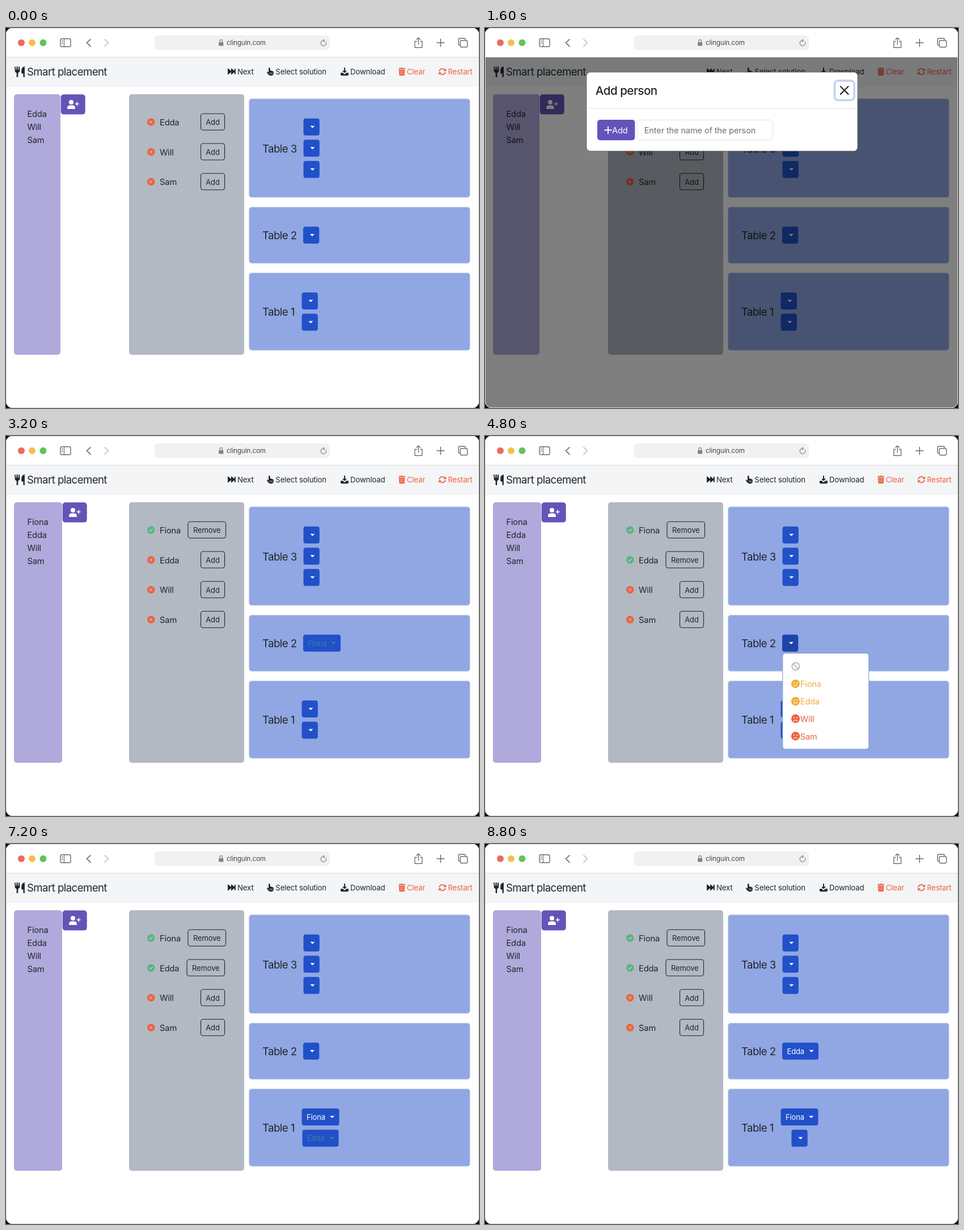
An HTML page for the animation above (9.6 s loop, 834 by 671 pixels).

```html
<!DOCTYPE html>
<html lang="en">
<head>
<meta charset="utf-8">
<title>Smart placement</title>
<style>
  html, body { margin: 0; width: 100%; height: 100%; overflow: hidden; background: #000; }
  svg { display: block; width: 834px; height: 671px; border-radius: 11px; background: #fff; }
  text { font-family: Inter, "Liberation Sans", sans-serif; white-space: pre; }
</style>
</head>
<body>
<svg id="stage" viewBox="0 0 834 671">
  <g id="page"></g>
  <g id="chrome"></g>
  <rect x=".5" y=".5" width="833" height="670" rx="10.5" fill="none" stroke="#d6d6d6"/>
</svg>
<script>
const INK = '#212529', PURPLE = '#6354b8', PURPLE_DARK = '#54479c';
const BLUE = '#2150c9', BLUE_DARK = '#1c44ab', DIM = '#3d80a8';
const RED = '#ee6140', ORANGE = '#f1ae3f', GREEN = '#5bb381', GREY = '#b2b9c3';
const STEP = 800;

// --- drawing helpers ---
const rect = (x, y, w, h, r, fill, extra = '') =>
  `<rect x="${x}" y="${y}" width="${w}" height="${h}" rx="${r}" fill="${fill}" ${extra}/>`;
const circle = (x, y, r, fill, extra = '') =>
  `<circle cx="${x}" cy="${y}" r="${r}" fill="${fill}" ${extra}/>`;
const fillPath = (d, fill) => `<path d="${d}" fill="${fill}"/>`;
const line = (d, color, w = 1.4, extra = 'stroke-linecap="round" stroke-linejoin="round"') =>
  `<path d="${d}" fill="none" stroke="${color}" stroke-width="${w}" ${extra}/>`;
const at = (x, y, body) => `<g transform="translate(${x} ${y})">${body}</g>`;

// y is the middle of the capitals
function text(s, x, y, size, color = INK, { spacing = -.01, anchor = 'start', weight = 400 } = {}) {
  return `<text x="${x}" y="${(y + size * .364).toFixed(2)}" font-size="${size}" fill="${color}" ` +
    `text-anchor="${anchor}" font-weight="${weight}" letter-spacing="${spacing}em">${s}</text>`;
}

// --- browser bar ---
function browserBar() {
  const g = '#6c6c6c';
  return rect(0, 0, 834, 51, 0, '#fff') + rect(0, 51, 834, 1, 0, '#d9dadb') +
    circle(27, 26, 6, '#ec6a5e') + circle(46, 26, 6, '#f4bf4f') + circle(65.5, 26, 6, '#61c554') +
    rect(96, 19, 18, 14, 2.5, 'none', `stroke="${g}" stroke-width="1.4"`) +
    line('M102.5 19V33M98.3 22.3h2M98.3 25h2M98.3 27.7h2', g, 1.1) +
    line('M149 20l-6.5 6 6.5 6.3', '#5f5f5f', 1.6) +
    line('M174 20l6.5 6-6.5 6.3', '#bcbcbc', 1.6) +
    rect(262, 13, 309, 26, 6, '#f1f1f1') +
    rect(375.2, 25, 8, 6.6, 1.2, '#838383') +
    line('M376.9 25v-2a2.3 2.4 0 0 1 4.6 0v2', '#838383', 1.2) +
    text('clinguin.com', 423.5, 26, 11.7, '#444', { anchor: 'middle' }) +
    line('M564.3 24.6a4.8 4.8 0 1 1-3-2.6M559.4 20.2l2.3 2-2.2 2.2', '#808080', 1.1) +
    line('M724 23.5h-3.2v11h12.8v-11h-3.2M727.2 29V17.4M724 20.3l3.2-3.2 3.2 3.2', g, 1.3) +
    line('M766.3 19.5v13.2M759.7 26.1h13.2', g, 1.5) +
    rect(801, 22, 12.6, 11.8, 2.6, '#fff', `stroke="${g}" stroke-width="1.4"`) +
    line('M800.5 30.5a2.6 2.6 0 0 1-2.6-2.6v-7a2.6 2.6 0 0 1 2.6-2.6h7a2.6 2.6 0 0 1 2.6 2.6', g);
}

// --- toolbar of the app ---
const icons = {
  utensils: fillPath('M0 0h1.6l.5 6h.9l.4-6h1.9l.4 6h.9l.5-6h1.6l.4 6.6q0 4-3.1 4.6v6.6q0 1.2-1.3 1.2t-1.3-1.2v-6.6' +
    'q-3.1-.6-3.1-4.6zM17.6 0v17.8q0 1.2-1.2 1.2t-1.2-1.2v-5.2h-2q-1.2 0-1.2-1.4v-5.2q.4-5 5.6-6z', INK),
  next: fillPath('M0 .7v9.6q0 1 .9.5l5-4.2v3.7q0 1 .9.5l5-4.2v3.6h2V.8h-2v3.6l-5-4.2q-.9-.5-.9.5v3.7l-5-4.2q-.9-.5-.9.5z', INK),
  hand: fillPath('M3 1.2a1.3 1.3 0 0 1 2.6 0v4q1.3-.6 2.2.5 1.2-.5 2 .6 2-.2 2 1.6v2.4q0 3.7-3.7 3.7h-2.4' +
    'q-1.6 0-2.7-1.4L.3 9.2q-.7-1.2.3-1.8 1-.4 1.7.5l.7.8z', INK) + line('M5.6 9v2.4M7.6 9v2.4M9.5 9v2.4', '#f3f5f7', .6),
  download: fillPath('M6 0h2v5.4h3.2L7 9.6 2.8 5.4H6zM1.4 9h2.4L7 12.1 10.2 9h2.4q1.4 0 1.4 1.4v2.2q0 1.4-1.4 1.4H1.4' +
    'Q0 14 0 12.6v-2.2Q0 9 1.4 9z', INK) + circle(11.7, 11.6, .6, '#f3f5f7'),
  trash: fillPath('M3.7.7 4.2 0h3.7l.5.7H12v1.8H0V.7zM.8 3.5h10.5l-.6 9.2q-.1 1.3-1.4 1.3H2.8q-1.3 0-1.4-1.3z', RED) +
    line('M3.7 5.5v6.3M6 5.5v6.3M8.3 5.5v6.3', '#f3f5f7', .5),
  rotate: line('M1 4.8Q2.6.9 6.4.9q2.5 0 4.7 2.3M12 7.2q-1.6 3.9-5.4 3.9-2.5 0-4.7-2.3', RED, 1.8) +
    fillPath('M13 .3v4.6H8.3zM0 11.7V7.1h4.7z', RED)
};

function toolbar() {
  const entries = [
    ['next', 391, 71.3, 'Next', 408, INK], ['hand', 460, 70, 'Select solution', 475.3, INK],
    ['download', 590, 70, 'Download', 607, INK], ['trash', 692, 70, 'Clear', 706.8, RED],
    ['rotate', 763, 71, 'Restart', 779.2, RED]
  ];
  return rect(0, 52, 834, 52, 0, '#f3f5f7') + at(15.3, 68, icons.utensils) +
    text('Smart placement', 37, 77.3, 18.6, INK, { spacing: -.03 }) +
    entries.map(([icon, x, y, s, tx, c]) => at(x, y, icons[icon]) + text(s, tx, 77, 13.2, c)).join('');
}

// --- columns ---
const OLD = ['Edda', 'Will', 'Sam'], ALL = ['Fiona', ...OLD];

function personColumn(people, pressed) {
  const w = people.length > 3 ? 85 : 82;
  const icon = circle(7, 4, 4, '#fff') +
    fillPath('M0 14.5q0-5 5-5h4q5 0 5 5 0 1.5-1 1.5H1q-1 0-1-1.5z', '#fff') +
    line('M17.2 4v6M14.2 7h6', '#fff', 1.5);
  return rect(14, 117, w, 460, 5, '#b0a9db') +
    people.map((p, i) => text(p, 37.4, 151.8 + 23 * i, 14.7)).join('') +
    rect(14.7 + w, 117.3, 43, 35.3, 5, pressed ? PURPLE_DARK : PURPLE) +
    at(26 + w, 127, icon);
}

function mark(y, ok) {
  return circle(255.7, y, 6.7, ok ? GREEN : RED) +
    (ok ? line(`M253 ${y + .2}l2 2 3.5-3.9`, '#c8d6d0', 1.1)
        : line(`M253.8 ${y - 1.9}l3.8 3.8m0-3.8l-3.8 3.8`, '#d5c4c0', 1.1));
}

function includeColumn(people, included) {
  return rect(217, 117, 203, 460, 5, GREY) + people.map((p, i) => {
    const y = 166 + 52.75 * i, ok = i < included;
    const right = ok && i === 0 ? 387.5 : 385.5, w = ok ? 66.5 : 42;
    return mark(y, ok) + text(p, 271, y + .6, 14.7) +
      rect(right - w, y - 14.7, w, 29, 4, 'none', `stroke="${INK}" stroke-width="1.1"`) +
      text(ok ? 'Remove' : 'Add', right - w / 2, y + .4, 13, INK, { anchor: 'middle' });
  }).join('');
}

// --- tables ---
function seat(x, y, { name = '', color = '#fff', dark = false } = {}) {
  const w = name === 'Fiona' ? 66 : name ? 64 : 28.3, c = x + w - 12.4;
  return rect(x, y, w, 30, 4, dark ? BLUE_DARK : BLUE) +
    (name ? text(name, x + 8.5, y + 15, 13, color) : '') +
    fillPath(`M${c - 4} ${y + 13}h8l-4 4z`, color);
}

function tables({ two, oneA, oneB, oneBx = 521.5 }) {
  const box = (label, y, h, mid) =>
    rect(428.7, y, 389.3, h, 4.5, '#90a7e3', 'stroke="#c0cbe8"') +
    text(label, 452, mid, 18.6, INK, { spacing: -.03 });
  return box('Table 3', 125, 174, 213) + box('Table 2', 316.3, 99, 366.5) + box('Table 1', 432.5, 136.5, 501.5) +
    [159.7, 197.2, 234.7].map(y => seat(524.5, y)).join('') +
    seat(524, 350.8, two) + seat(521.5, 467, oneA) + seat(oneBx, 504.4, oneB);
}

const moods = {
  good: [GREEN, 'M-3.6 1.6q3.6 4 7.2 0'],
  fair: [ORANGE, 'M-3 2.8h6'],
  bad: [RED, 'M-3.2 4.2q3.2-3.6 6.4 0']
};

function menu({ x, y, faces }) {
  return rect(x, y, 152, 169.5, 5, '#fff', 'stroke="#8295c6"') +
    circle(x + 23, y + 23.2, 6.5, 'none', `stroke="${GREY}" stroke-width="1.9"`) +
    line(`M${x + 18.4} ${y + 18.6}l9.2 9.2`, GREY, 1.9) +
    ALL.map((p, i) => {
      const [color, mouth] = moods[faces[i]], cy = y + 54 + 30.8 * i;
      return at(x + 22.7, cy, circle(0, 0, 7.6, color) + circle(-2.6, -1.6, 1, '#fff') +
        circle(2.6, -1.6, 1, '#fff') + line(mouth, '#fff', 1.1)) + text(p, x + 31, cy + .5, 14.6, color);
    }).join('');
}

// --- dialog ---
function dialog(typed) {
  const input = (stroke, extra) => rect(268.5, 162.3, 239, 35.7, 5, '#fff', `stroke="${stroke}" ${extra}`);
  return '<rect x="1" y="52" width="832" height="618" fill="#000" opacity=".5"/>' +
    rect(179, 78, 478, 139.3, 6.5, '#fff', 'stroke="#606060" stroke-width=".8"') +
    rect(179.5, 141.4, 477, 1, 0, '#dee2e6') +
    text('Add person', 194.8, 110.3, 20.6, INK, { spacing: -.025, weight: 500 }) +
    (typed ? '' : rect(616.5, 93, 34.6, 34.4, 6, '#fff', 'stroke="#c7d3f2" stroke-width="3.8"')) +
    line('M626.8 103.2l13.8 13.8m0-13.8l-13.8 13.8', typed ? '#7c7c7c' : '#0c0c0c', 1.9) +
    rect(198, 162, 66.4, 36.3, 5, PURPLE) + line('M217 174.4v11.8M211.1 180.3h11.8', '#fff', 1.9) +
    text('Add', 224, 180.6, 14.6, '#fff') +
    (typed
      ? rect(266.3, 160, 243.6, 40.2, 7, '#c8d4f3') + input('#90a7e4', '') +
        text(typed, 280.7, 180.6, 14.6) + rect(319, 172, 1, 17.5, 0, '#111')
      : input('#dee2e6', '') + text('Enter the name of the person', 280.7, 180.6, 14.6, '#6b7076'));
}

// --- the story, one entry per step ---
const dark = { dark: true };
const [first, second] = ALL;
const shared = { people: ALL, included: 2 };
const paired = { ...shared, oneA: { name: first }, oneB: { name: second, color: DIM }, oneBx: 522.5 };
const pickOne = { ...shared, oneA: dark, menu: { x: 522.3, y: 500, faces: ['good', 'good', 'bad', 'bad'] } };
const steps = [
  {},
  { pressed: true },
  { dialog: true },
  { dialog: true, typed: first },
  { people: ALL, included: 1, two: { name: first, color: DIM } },
  shared,
  { ...shared, two: dark, menu: { x: 524.8, y: 383.5, faces: ['fair', 'fair', 'bad', 'bad'] } },
  pickOne,
  pickOne,
  paired,
  { ...paired, two: dark, menu: { x: 524.8, y: 383.5, faces: ['bad', 'fair', 'bad', 'bad'] } },
  { ...shared, two: { name: second }, oneA: { name: first }, oneBx: 540.4 }
];

function render(s) {
  const people = s.people || OLD;
  return toolbar() + personColumn(people, s.pressed) + includeColumn(people, s.included || 0) + tables(s) +
    (s.menu ? menu(s.menu) : '') + (s.dialog ? dialog(s.typed) : '');
}

const page = document.getElementById('page');
document.getElementById('chrome').innerHTML = browserBar();
const start = performance.now();
let shown = -1;

function tick() {
  const i = Math.floor((performance.now() - start) / STEP) % steps.length;
  if (i !== shown) page.innerHTML = render(steps[shown = i]);
  requestAnimationFrame(tick);
}
tick();
</script>
</body>
</html>
```
